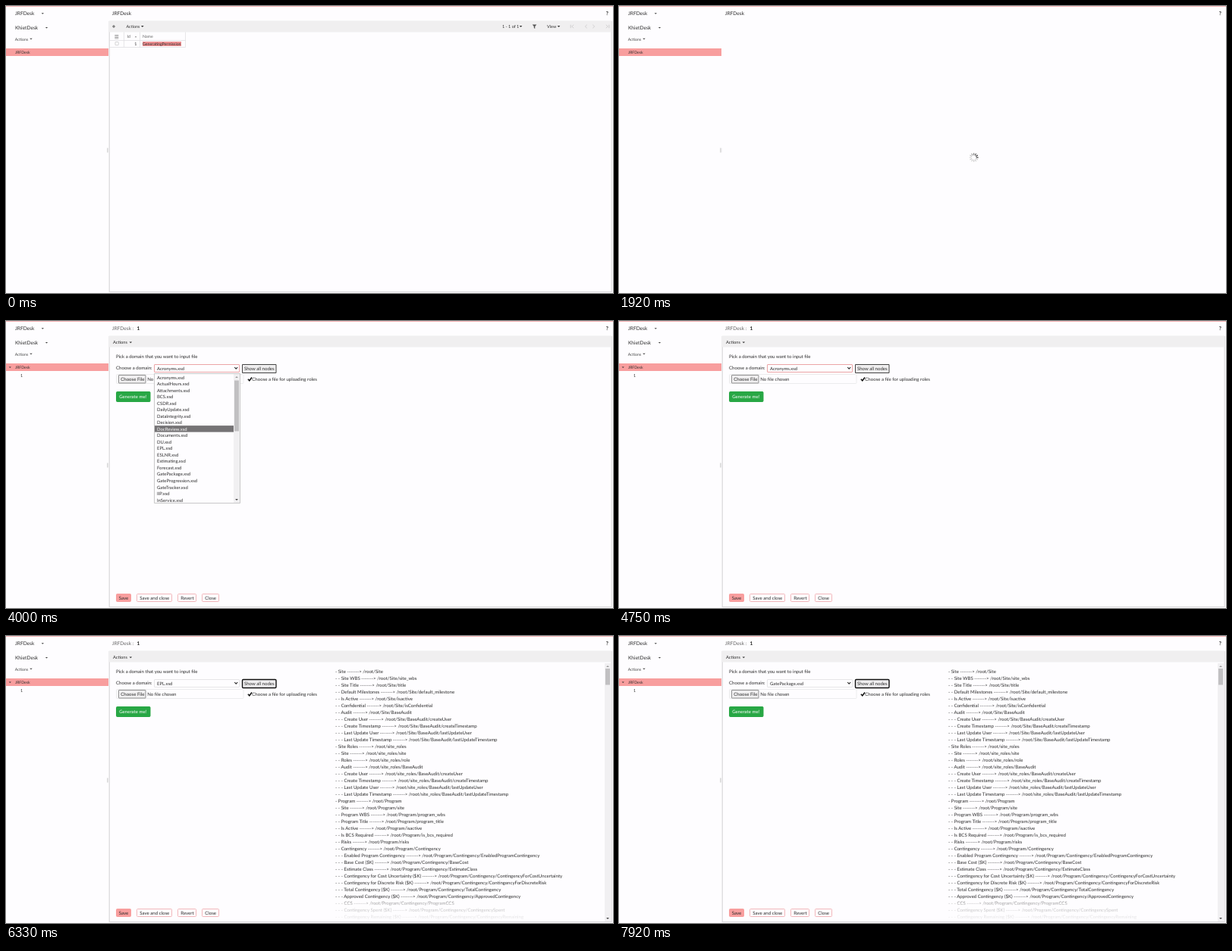
These frames come from a looping animation (800x379 px, 8 s). An HTML page with a canvas:

```html
<!DOCTYPE html>
<html lang="en">
<head>
<meta charset="utf-8">
<title>Domain form</title>
<style>
html, body { margin: 0; width: 100%; height: 100%; overflow: hidden; background: #fefdff; }
canvas { display: block; width: 800px; height: 379px; }
</style>
</head>
<body>
<canvas id="stage"></canvas>
<script>
const LOOP = 8000, W = 800, H = 379;
const BG = '#fefdff', PINK = '#f89e9e', INK = '#2c2c2c', BAR = '#f0eff0', RULE = '#dddcde';
const APP = 'JRFDesk', OWNER = 'KhietDesk';
const canvas = document.getElementById('stage');
const ctx = canvas.getContext('2d');
const ratio = window.devicePixelRatio || 1;
canvas.width = W * ratio;
canvas.height = H * ratio;
ctx.textRendering = 'geometricPrecision';

const files = ('Acronyms ActualHours Attachments BCS CSDR DailyUpdate DataIntegrity Decision ' +
  'DocReview Documents DU EPL ESLNR Estimating Forecast GatePackage GateProgression ' +
  'GateTracker IIP InService').split(' ').map(name => name + '.xsd');

// Each node: depth, label, path below /root/
const audit = base => [
  [2, 'Audit', base + '/BaseAudit'],
  ...['Create User', 'Create Timestamp', 'Last Update User', 'Last Update Timestamp'].map(label => {
    const key = label.replace(/ /g, '');
    return [3, label, base + '/BaseAudit/' + key[0].toLowerCase() + key.slice(1)];
  })
];
const fund = (label, key) => [3, label, 'Program/Contingency/' + key];
const nodes = [
  [1, 'Site', 'Site'],
  [2, 'Site WBS', 'Site/site_wbs'],
  [2, 'Site Title', 'Site/title'],
  [2, 'Default Milestones', 'Site/default_milestone'],
  [2, 'Is Active', 'Site/isactive'],
  [2, 'Confidential', 'Site/isConfidential'],
  ...audit('Site'),
  [1, 'Site Roles', 'site_roles'],
  [2, 'Site', 'site_roles/site'],
  [2, 'Roles', 'site_roles/role'],
  ...audit('site_roles'),
  [1, 'Program', 'Program'],
  [2, 'Site', 'Program/site'],
  [2, 'Program WBS', 'Program/program_wbs'],
  [2, 'Program Title', 'Program/program_title'],
  [2, 'Is Active', 'Program/isactive'],
  [2, 'Is BCS Required', 'Program/is_bcs_required'],
  [2, 'Risks', 'Program/risks'],
  [2, 'Contingency', 'Program/Contingency'],
  fund('Enabled Program Contingency', 'EnabledProgramContingency'),
  fund('Base Cost ($K)', 'BaseCost'),
  fund('Estimate Class', 'EstimateClass'),
  fund('Contingency for Cost Uncertainty ($K)', 'ContingencyForCostUncertainty'),
  fund('Contingency for Discrete Risk ($K)', 'ContingencyForDiscreteRisk'),
  fund('Total Contingency ($K)', 'TotalContingency'),
  fund('Approved Contingency ($K)', 'ApprovedContingency'),
  fund('CCS', 'ProgramCCS'),
  fund('Contingency Spent ($K)', 'ContingencySpent'),
  fund('Contingency Remaining ($K)', 'ContingencyRemaining')
].map(([depth, label, path]) => '- '.repeat(depth) + label + ' -------> /root/' + path);

// y is the middle of the capital letters
function text(str, x, y, size = 6.08, color = INK, weight = 400) {
  ctx.font = `${weight} ${size}px Lato, sans-serif`;
  ctx.fillStyle = color;
  ctx.fillText(str, x, y + size * 0.36);
}

function rect(x, y, w, h, color) {
  ctx.fillStyle = color;
  ctx.fillRect(x, y, w, h);
}

function box(x, y, w, h, stroke, fill = BG, line = 1, radius = 0) {
  ctx.beginPath();
  ctx.roundRect(x, y, w, h, radius);
  ctx.fillStyle = fill;
  ctx.fill();
  ctx.strokeStyle = stroke;
  ctx.lineWidth = line;
  ctx.stroke();
}

function path(points, color, line) {
  ctx.beginPath();
  points.forEach(([x, y]) => ctx.lineTo(x, y));
  if (line) {
    ctx.strokeStyle = color;
    ctx.lineWidth = line;
    ctx.stroke();
  } else {
    ctx.fillStyle = color;
    ctx.fill();
  }
}

// dir 1 points down, -1 up
function caret(x, y, r = 1.8, dir = 1, color = '#333') {
  path([[x - r, y - dir * r / 2], [x + r, y - dir * r / 2], [x, y + dir * r / 2]], color);
}

function scrollbar(x, top, bottom, thumbTop, thumbEnd) {
  rect(x, top, 8, bottom - top, '#f1f0f2');
  rect(x + 1, thumbTop, 6, thumbEnd - thumbTop, '#c1c0c2');
  caret(x + 4, top + 4, 1.9, -1, '#999');
  caret(x + 4, bottom - 4, 1.9, 1, '#444');
}

function frame(formOpen) {
  rect(0, 0, W, H, BG);
  rect(0, 0, W, 1, '#f5b3b5');
  text(APP, 12, 9.7, 6.6);
  caret(48.3, 10, 1.6);
  text(OWNER, 12, 28.2, 6.6);
  caret(53.5, 28.8, 1.6);
  text('Actions', 11.7, 43.7, 5.3, '#444');
  caret(33, 43.5, 1.7);
  rect(0, 56, 135, 10, PINK);
  text(APP, 12, 61.2, 5.1);
  rect(133, 187.5, 0.7, 6, '#ccc');
  rect(134.5, 187.5, 0.7, 6, '#ccc');
  text('?', 790.8, 9.8, 6.8, '#222', 700);
  text(APP, 139.7, 9.7, 6.6, formOpen ? '#666' : INK);
  if (formOpen) {
    caret(5.3, 61.3, 1.6);
    text('1', 19, 72, 5.4);
    text(':', 166.5, 9.7, 6.6, '#666');
    text('1', 172.5, 9.7, 6.6, '#222', 700);
  }
}

function panel() {
  rect(135, 20, 1, 358, '#efeef0');
  rect(136, 20, 1, 358, '#dfdee0');
  rect(797.5, 20, 1.3, 358, '#dfdee0');
  rect(136, 377, 662, 1, '#d9d8da');
  rect(136, 19.5, 662, 15, BAR);
}

function grid() {
  panel();
  path([[140, 27], [144, 27]], '#444', 0.8);
  path([[142, 25], [142, 29]], '#444', 0.8);
  text('Actions', 158.5, 27, 5.4);
  caret(179.8, 27);
  text('1 - 1 of 1', 654, 27, 5.5);
  caret(678.5, 27);
  path([[693.7, 24.5], [699.3, 24.5], [697.2, 27], [697.2, 30], [695.8, 29], [695.8, 27]], '#555');
  text('View', 713, 27, 5.5);
  caret(728.5, 27);
  const pale = '#c9c8ca';
  const chevron = (x, d) => path([[x - d, 24.8], [x + d, 27], [x - d, 29.2]], pale, 0.8);
  path([[744.2, 24.8], [744.2, 29.2]], pale, 0.8);
  chevron(747, -1.2);
  chevron(764.5, -1.2);
  chevron(774.5, 1.2);
  chevron(792, 1.2);
  path([[794.8, 24.8], [794.8, 29.2]], pale, 0.8);

  for (const y of [45, 54]) rect(137, y, 99.5, 0.7, RULE);
  for (const x of [155, 176, 236]) rect(x, 34.5, 0.7, 20, RULE);
  for (const y of [38, 39.6, 41.2, 42.6]) rect(143.3, y, 5, 0.7, '#888');
  text('Id', 159.7, 40, 5.3, '#666');
  caret(171, 40.5, 1.3, -1, '#777');
  text('Name', 180, 40, 5.3, '#666');
  box(144, 47.5, 4.2, 4.2, '#bbb', BG, 0.6, 0.5);
  text('1', 169.3, 50, 5.4);
  rect(180, 47, 51, 6, '#ee9092');
  text('GeneratingPermission', 180, 50, 5.25);
}

function spinner(t) {
  const step = Math.floor((t - 1920) / 83.3);
  ctx.lineCap = 'round';
  for (let i = 0; i < 12; i++) {
    const age = ((step - i) % 12 + 12) % 12;
    const a = i * Math.PI / 6, c = Math.cos(a), s = Math.sin(a);
    const g = Math.min(205, 20 + age * 34);
    path([[467.7 + c * 3.4, 200 + s * 3.4], [467.7 + c * 5.5, 200 + s * 5.5]], `rgb(${g},${g},${g})`, 1.2);
  }
  ctx.lineCap = 'butt';
}

function form({ file, selectFocus, buttonFocus }) {
  panel();
  text('Actions', 141, 28.3, 5.7);
  caret(164.3, 28.3);
  text('Pick a domain that you want to input file', 145, 47);
  text('Choose a domain:', 145, 62);
  box(195.5, 57.5, 112, 10, selectFocus ? '#e99a9c' : '#e4e3e5', BG, 0.9, 0.5);
  text(file, 199, 62.7, 5.95);
  path([[301.2, 61], [303.2, 63.2], [305.2, 61]], '#222', 1.1);
  box(311.5, 57.5, 44.5, 11, buttonFocus ? '#111' : '#444', BAR, buttonFocus ? 1.4 : 1, buttonFocus ? 1.2 : 0);
  text('Show all nodes', 313.9, 63.2);

  box(145.5, 70.5, 167.5, 12, '#e6e5e7', BG, 0.7, 1);
  box(148.5, 71.5, 35.5, 10.5, '#777', BAR, 0.8, 0.4);
  text('Choose File', 151.2, 77);
  text('No file chosen', 186.3, 76.8);
  path([[318.9, 76.8], [320.8, 78.8], [324, 74.5]], '#111', 1.5);
  text('Choose a file for uploading roles', 324.3, 76.8);
  box(145.5, 93.5, 44.5, 13, '#28a745', '#28a745', 1, 1);
  text('Generate me!', 149.2, 100.3, 6.08, '#fff');

  box(145.5, 360.5, 19, 10, PINK, PINK, 1, 1);
  text('Save', 148.8, 366.2);
  for (const [label, x, w] of [['Save and close', 172.5, 46], ['Revert', 226.5, 24], ['Close', 258.5, 22]]) {
    box(x, 360.5, w, 10, '#efa5aa', BG, 0.8, 1);
    text(label, x + 3.8, 366.2);
  }
}

function tree() {
  nodes.forEach((line, i) => text(line, 434, 47.1 + i * 9));
  const fade = ctx.createLinearGradient(0, 346, 0, 375);
  fade.addColorStop(0, 'rgba(254,253,255,0)');
  fade.addColorStop(0.25, 'rgba(254,253,255,.6)');
  fade.addColorStop(1, 'rgba(254,253,255,.94)');
  rect(430, 346, 358, 30, fade);
  scrollbar(789, 36, 377, 43, 64.5);
}

function dropdown(active) {
  box(195.5, 69.5, 113, 171, '#bbb', BG, 0.8);
  rect(196, 69.9 + active * 8.53, 104, 8.5, '#757375');
  files.forEach((name, i) => text(name, 199, 74.4 + i * 8.53, 5.95, i === active ? '#fff' : INK));
  scrollbar(300, 70, 240, 78.5, 145.5);
}

// Whole step between a and b while t runs from t0 to t1
const glide = (t, t0, t1, a, b) => Math.round(a + (b - a) * Math.min(1, Math.max(0, (t - t0) / (t1 - t0))));
const during = (t, a, b) => t >= a && t < b;

function draw(t) {
  const formOpen = t >= 2250;
  frame(formOpen);
  if (t < 920) grid();
  if (during(t, 1580, 2250)) spinner(t);
  if (!formOpen) return;

  form({
    file: files[t < 4920 ? 0 : t < 7500 ? 11 : 15],
    selectFocus: during(t, 2500, 5580) || during(t, 6500, 7750),
    buttonFocus: during(t, 5580, 6500) || t >= 7750
  });
  if (t >= 5750) tree();
  if (during(t, 2580, 4500)) dropdown(t < 4080 ? glide(t, 3250, 3960, 0, 8) : glide(t, 4080, 4330, 8, 11));
  if (during(t, 6580, 7420)) dropdown(glide(t, 6750, 7170, 11, 15));
}

function tick(now) {
  ctx.setTransform(ratio, 0, 0, ratio, 0, 0);
  draw(now % LOOP);
  requestAnimationFrame(tick);
}
requestAnimationFrame(tick);
</script>
</body>
</html>
```
